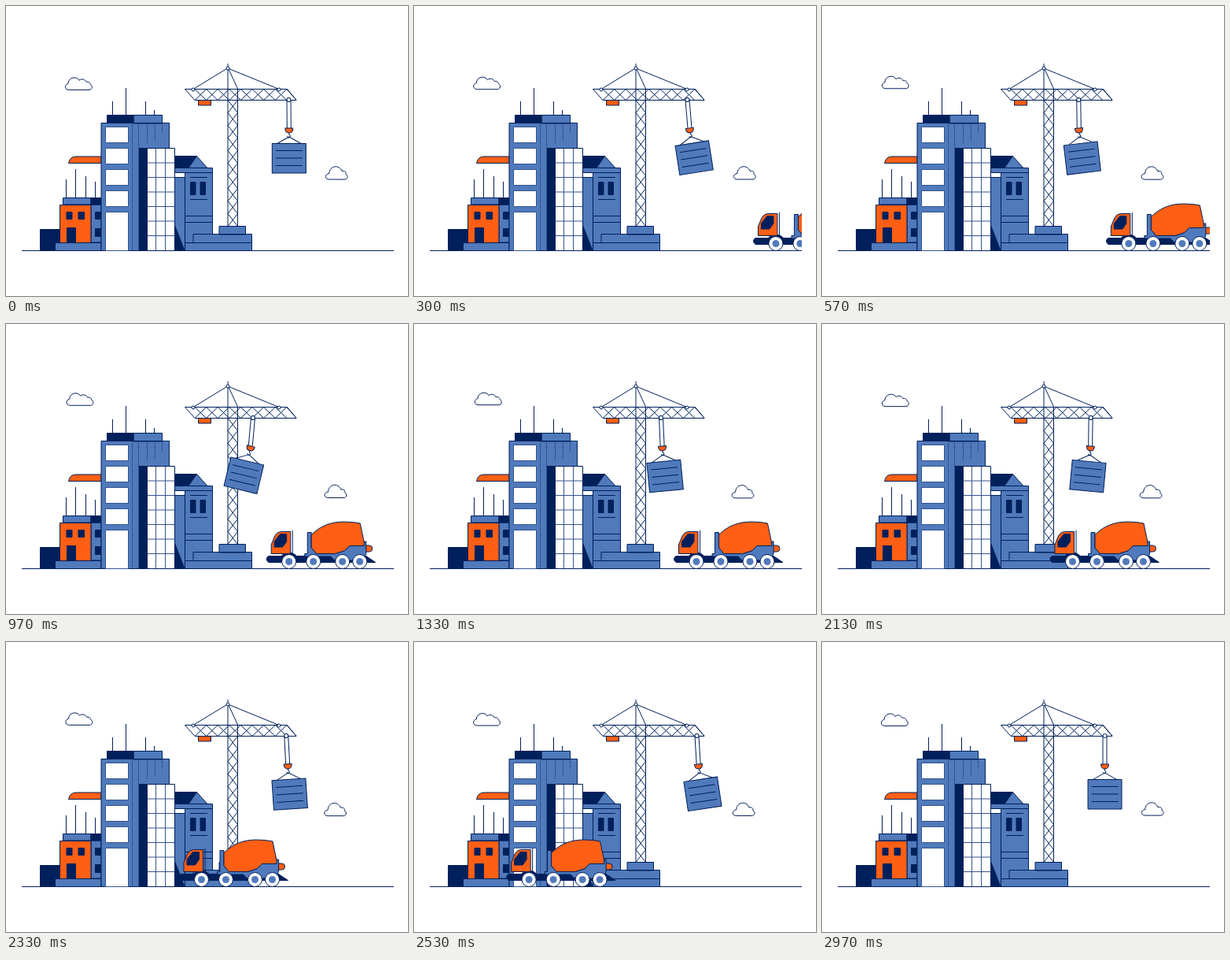
These frames come from a looping animation (511 px wide and 368 px high, 3030 ms). An HTML page:

```html
<!DOCTYPE html>
<html>
<head>
<meta charset="utf-8">
<style>
html, body { margin: 0; width: 100%; height: 100%; overflow: hidden; background: #fff; }
svg { display: block; width: 511px; height: 368px; stroke: #00205b; stroke-width: 1; stroke-linejoin: round; fill: none; }
.n { fill: #00205b; }
.b { fill: #507abb; }
.o { fill: #ff5f14; }
.w { fill: #fff; }
.soft { stroke: #34558f; }
.hub { stroke: none; }
</style>
</head>
<body>
<svg viewBox="0 0 511 368">
  <clipPath id="stage"><rect x="19" y="80" width="474" height="240"/></clipPath>

  <path id="cloudL" class="w" d="M80 106.500c-6 0-6-7-1-8c0-8 11-10 14-4c3-3 8-1 9 2c4-1 5 2 5 3c4 2 2 7-1 7z"/>
  <path id="cloudR" class="w" d="M411 220c-6 0-6-7 0-7.500c0-10 13-12 16-3c4-1 6 2 5 4c4 2 2 6.500-1 6.500z"/>
  <path d="M20 310.500H493"/>

  <!-- low house -->
  <path class="n" d="M43.500 283.500H69V310.500H43.500z"/>
  <path d="M76.500 220V243M88.500 207V243M101.500 216V243M113.500 223V243"/>
  <path class="b" d="M72.500 243.500H108V252H72.500zM108 252H121V300H108z"/>
  <path class="n" d="M108 243.500H121V252H108z"/>
  <path class="o" d="M68.500 252.500H108V300.500H68.500zM79.500 199.500Q81 191 89 191H121V199.500z"/>
  <path class="n" d="M77 261.500h7v9h-7zM92 261.500h7.500v9H92zM113.500 261.500H121v9h-7.500zM113.500 282.500H121v10h-7.500zM77.500 281.500h11V300h-11z"/>
  <path class="b" d="M62.500 300.500H121V310.500H62.500z"/>

  <!-- right house -->
  <path class="n" d="M214 190.500H242.500L232 205.500H214z"/>
  <path class="b" d="M242.500 190.500L256 205.500H232zM214 205.500H262.500V310.500H214z"/>
  <path class="w" d="M214 211.500H227.500V217.500H214z"/>
  <path d="M227.500 211.500V310M227.500 211.500H262M234 217.500H256M234 245.500H256M227.500 266.500H262M227.500 274.500H262"/>
  <path class="n" d="M234.500 223.500h6.500v16h-6.500zM247 223.500h6.500v16H247zM214 277L227 310.500H214z"/>

  <!-- towers -->
  <path d="M135.500 121V138M152.500 104V138M177.500 121V138M188.500 132V138"/>
  <path class="b" d="M162 138.500H198.500V149H162zM121 148.500H207.500V310.500H121z"/>
  <path class="n" d="M128.500 138.500H162V148.500H128.500z"/>
  <path class="soft" d="M160.500 149V310M168.500 149V310M179.500 149V174M189.500 149V171M198.500 149V161"/>
  <path class="w soft" d="M126.500 153.500h29v20h-29zM126.500 180.500h29v20h-29zM126.500 207.500h29v20h-29zM126.500 234.500h29v20h-29zM126.500 261.500h29v49h-29z"/>
  <path class="n" d="M169.500 180.500H179V310.500H169.500z"/>
  <path class="w" d="M179.500 180.500H214.500V310.500H179.500z"/>
  <path id="grid" class="soft"/>

  <!-- crane -->
  <path class="b" d="M271 279.500H304.500V290H271zM238 289.500H312.500V300.500H238zM227.500 300.500H312.500V310.500H227.500z"/>
  <path d="M282 73V279M294.500 105V279M281.500 79L238 105.500M282.500 79L294.500 105M282 79L347 105.500M227.500 105.500H357.500L369 119.500H240z"/>
  <path id="lattice"/>
  <g class="w"><circle cx="282" cy="79" r="2"/><circle cx="238" cy="106" r="2"/><circle cx="347" cy="106" r="2"/></g>
  <path class="o" d="M244.500 119.500H260.500V126H244.500z"/>

  <!-- hanging load, origin at the trolley -->
  <g id="cable">
    <path d="M-2.500 0V36M2.500 0V36"/>
    <circle class="w" r="2.500"/>
    <g id="load">
      <path d="M0 41V44q3 2 0 4q-2 0-2-2M0 47L-15 55.500M0 47L15 55.500"/>
      <path class="o" d="M-5 36H5Q5 42 0 42T-5 36z"/>
      <path class="b" d="M-21.500 55.500H21.500V93H-21.500z"/>
      <path d="M-17 64.500H17M-17 74H17M-17 83.500H17"/>
    </g>
  </g>

  <!-- mixer truck, origin at the front wheel -->
  <g clip-path="url(#stage)"><g id="truck">
    <path class="o" d="M97 281h5q4 0 4 4t-4 4h-5z"/>
    <path class="n" d="M-26 294.500H98L110 302.500H-26Q-31 298-26 294.500z"/>
    <path class="n" d="M-12 301a12 11 0 0 1 24 0z"/>
    <path class="b" d="M23.500 264.500H28.500V284L35 291.500H59L71 287.500L77 281.500H94.500V276H98V292L92 300H58L53 295H20V291.500H23.500z"/>
    <path class="o" d="M28.500 267.500C41 255 55 251 70 251Q82 251 90.500 253L95.500 277V281.500H77L71 287.500L59 291.500H35L28.500 284z"/>
    <path class="o" d="M-22.500 291.500V280L-18 269Q-15 263.500-10 263.500H2V291.500z"/>
    <path class="n" d="M-18.500 283V276L-11 266.500H-3V276L-8 283z"/>
    <path d="M4.500 262V291"/>
    <g id="wheels"></g>
  </g></g>
</svg>
<script>
const LOOP = 3030;
const $ = id => document.getElementById(id);
const line = (x1, y1, x2, y2) => `M${x1} ${y1}L${x2} ${y2}`;
const cross = (x, y, w, h) => line(x, y, x + w, y + h) + line(x + w, y, x, y + h);
const move = (id, value) => $(id).setAttribute('transform', value);

let grid = line(190.5, 181, 190.5, 310) + line(202.5, 181, 202.5, 310);
for (let i = 1; i < 7; i++) grid += line(180, 180.5 + i * 18.5, 214, 180.5 + i * 18.5);
$('grid').setAttribute('d', grid);

let lattice = line(357, 106, 369, 119);
for (let i = 0; i < 10; i++) lattice += cross(282, 119.5 + i * 16, 12.5, 16);
for (let i = 0; i < 8; i++) lattice += cross(240 + i * 14.6, 105.5, 14.6, 14);
$('lattice').setAttribute('d', lattice);

$('wheels').innerHTML = [0, 31, 68, 90].map(x =>
  `<circle class="w" cx="${x}" cy="301.500" r="9"/><circle class="b hub" cx="${x}" cy="301.500" r="4.500"/>`).join('');

// Cosine-eased interpolation through [time, value] pairs
function keyed(keys, t) {
  const i = keys.findIndex(k => k[0] > t);
  if (i < 0) return keys[keys.length - 1][1];
  if (!i) return keys[0][1];
  const [t0, a] = keys[i - 1], [t1, b] = keys[i];
  return a + (b - a) * (1 - Math.cos(Math.PI * (t - t0) / (t1 - t0))) / 2;
}

const trolley = [[0, 359.5], [875, 314], [1690, 314], [2465, 359.5]];
const tilt = [[0, 0], [420, -11], [970, 13.5], [1370, -6], [1730, -1], [1990, 8], [2520, -8.5], [2970, 0]];

function truckX(t) {
  if (t < 1128) return 359 + 31 * ((1128 - t) / 558) ** 3;
  const u = Math.max(0, t - 1824);
  return 359 - (u < 640 ? 0.00043 * u * u : 176 + 0.55 * (u - 640));
}

const sway = t => Math.sin(Math.PI * t / LOOP) ** 2;

function draw(now) {
  const t = now % LOOP;
  const box = keyed(tilt, t);
  const rope = 0.45 * keyed(tilt, t + 80); // the rope leads the load
  const left = sway(t + 150), right = sway(t - 200);
  move('cloudL', `translate(${2 * left} ${-3.8 * left})`);
  move('cloudR', `translate(${-2.8 * right} ${right})`);
  move('cable', `translate(${keyed(trolley, t)} 119) rotate(${rope})`);
  move('load', `rotate(${box - rope} 0 40)`);
  move('truck', `translate(${truckX(t)})`);
  requestAnimationFrame(draw);
}
draw(performance.now());
</script>
</body>
</html>
```
